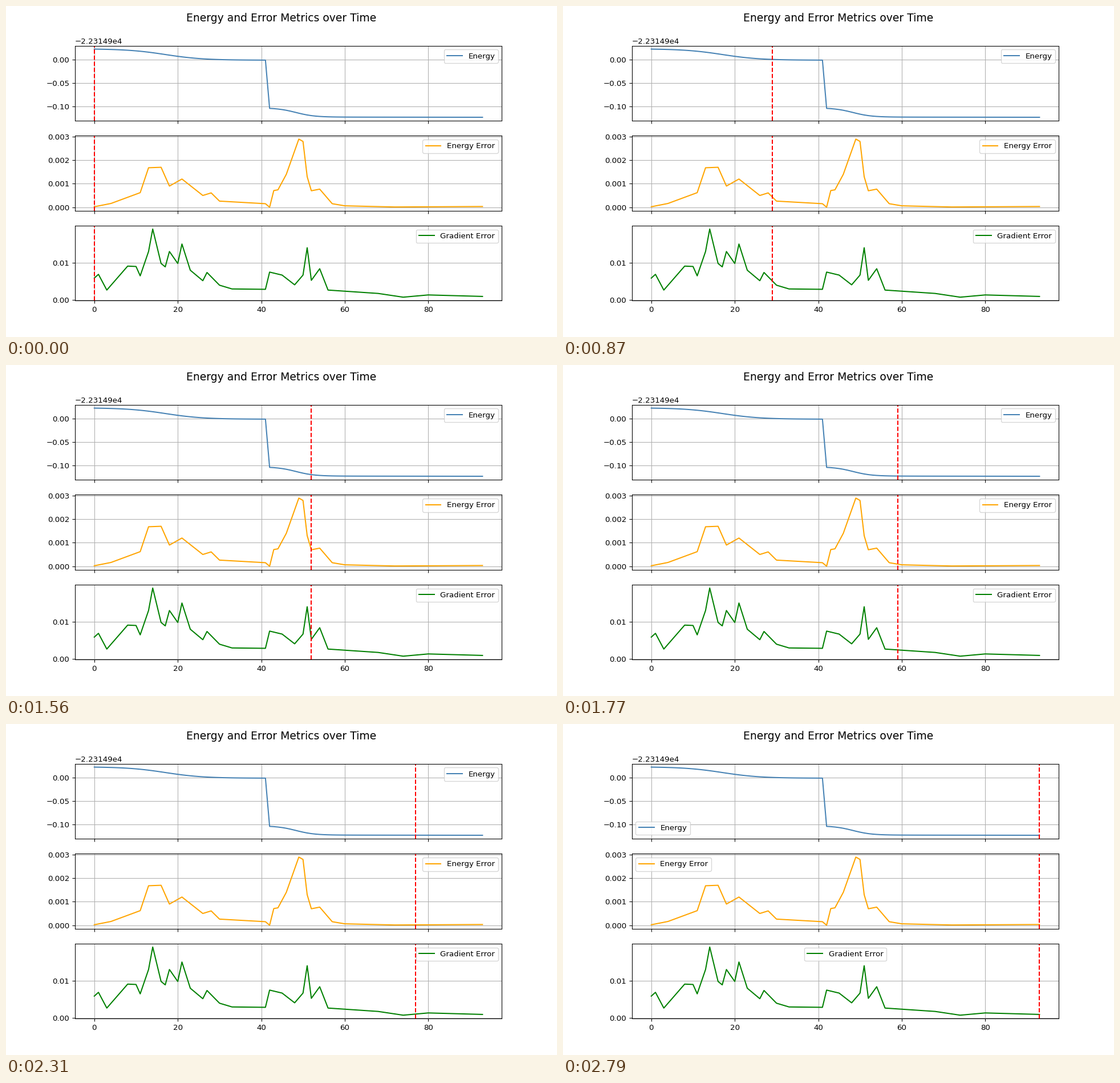
A matplotlib script that plays this animation: 966x580 px, repeating every 2820 ms.

```python
import matplotlib.pyplot as plt
import numpy as np
from matplotlib.animation import FuncAnimation

STEPS = 94
DPI = 96.6
BASE = -22314.9
steps = np.arange(STEPS)


def fall(center, rate):
    """Smooth drop from 1 to 0 around center."""
    return 1 / (1 + np.exp(rate * (steps - center)))


def trace(scale, *turns):
    """Straight runs between turning points (step, value)."""
    return scale * np.interp(steps, *np.transpose(turns))


# Two slow relaxations with a sudden jump between them
before = 24.4 * fall(17, 0.22) - 0.8
after = 19.8 * fall(48.3, 0.45) - 123.4 - 0.01 * (steps - 42)
energy = BASE + 1e-3 * np.where(steps < 42, before, after)

energy_error = trace(
    1e-5, (0, 2), (4, 16), (11, 62), (13, 168), (16, 170), (18, 90),
    (21, 120), (26, 50), (28, 61), (30, 26), (41, 15), (42, 0), (43, 71),
    (44, 74), (46, 140), (49, 290), (50, 280), (51, 130), (52, 70),
    (54, 77), (57, 15), (60, 6), (72, 1), (93, 3))

gradient_error = trace(
    1e-4, (0, 59), (1, 69), (3, 27), (8, 91), (10, 90), (11, 65),
    (13, 130), (14, 190), (16, 98), (17, 89), (18, 130), (20, 98),
    (21, 150), (23, 80), (26, 52), (27, 74), (30, 40), (33, 30), (41, 29),
    (42, 75), (45, 67), (48, 41), (50, 67), (51, 140), (52, 53), (54, 84),
    (56, 27), (68, 18), (74, 8), (80, 14), (93, 10))

# A hair over 966 x 580 px, so that rounding down gives the exact size
fig, axes = plt.subplots(3, 1, sharex=True, dpi=DPI,
                         figsize=(966.01 / DPI, 580.01 / DPI))
fig.suptitle("Energy and Error Metrics over Time", fontsize=14)

series = [
    (energy, "Energy", "steelblue"),
    (energy_error, "Energy Error", "orange"),
    (gradient_error, "Gradient Error", "green"),
]
cursors = []
for ax, (values, label, color) in zip(axes, series):
    ax.plot(steps, values, color=color, label=label)
    cursors.append(ax.axvline(0, color="red", linestyle="--"))
    ax.grid(True)
    # "best" lets each legend jump away when the cursor reaches it
    ax.legend(loc="best")
axes[0].ticklabel_format(axis="y", useOffset=BASE)


def update(step):
    for cursor in cursors:
        cursor.set_xdata([step, step])
    return cursors


anim = FuncAnimation(fig, update, frames=STEPS, interval=30,
                     repeat=True, repeat_delay=0, blit=False)
plt.show()
```
